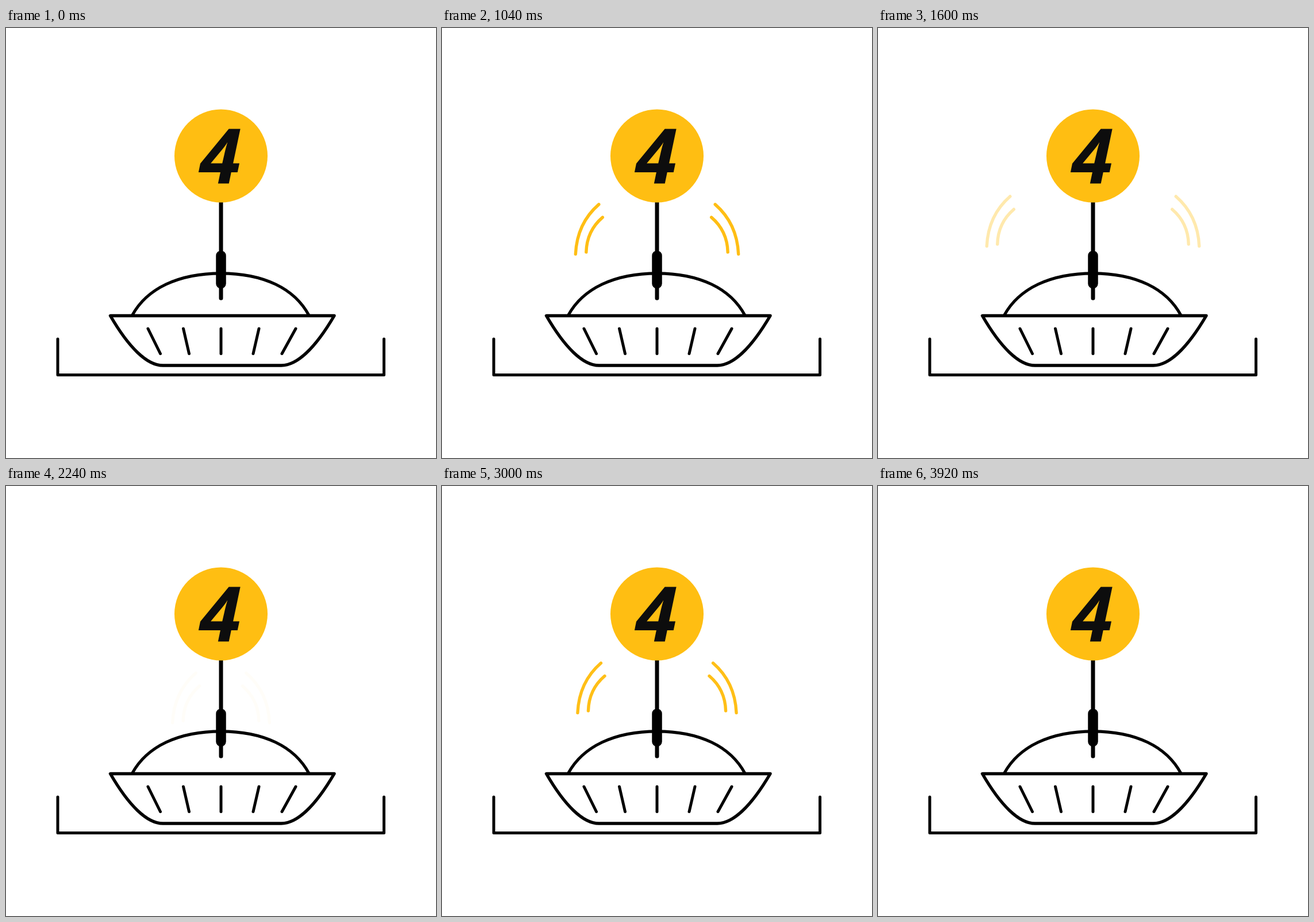
Animation of 748x748 px, one loop 4000 ms. Source, as an HTML page with a canvas:

```html
<!DOCTYPE html>
<html lang="en">
<head>
<meta charset="utf-8">
<title>Table marker</title>
<style>
  html, body { margin: 0; width: 100%; height: 100%; overflow: hidden; background: #fff; }
  canvas { display: block; width: 748px; height: 748px; }
</style>
</head>
<body>
<canvas id="stage" width="748" height="748"></canvas>
<script>
const SIZE = 748, MID = 374, PERIOD = 2000, STEP = 40;
const YELLOW = '#ffbe12', BLACK = '#000', INK = '#0d0d0d';
const FONT = '"Open Sans", "Noto Sans", sans-serif';
const ctx = document.getElementById('stage').getContext('2d');

const clamp = v => Math.min(1, Math.max(0, v));
const ease = v => (1 - Math.cos(Math.PI * clamp(v))) / 2;
const ramp = (t, from, to) => ease((t - from) / (to - from));

function stroke(d, width, color = BLACK) {
  ctx.lineWidth = width;
  ctx.strokeStyle = color;
  ctx.stroke(new Path2D(d));
}

function drawDish() {
  stroke('M90 541V603.5H657.5V541', 5);
  stroke('M219.5 500C245 453 300 426.8 374 426.8S502 453 527 500', 5.2);
  stroke('M181.5 500.5H571C539 555 507 587 479 587H273C245 587 213 555 181.5 500.5Z', 5.4);
  stroke('M247 523L268.5 566.5M308.5 523L318.5 566.5M374 523V566.5' +
         'M440 523L430 566.5M504 523L480 566.5', 5);
}

function drawMarker() {
  stroke('M374 290V470', 7);
  stroke('M374 396V444.5', 17.5);
  ctx.fillStyle = YELLOW;
  ctx.beginPath();
  ctx.arc(MID, 222.5, 81, 0, Math.PI * 2);
  ctx.fill();
  drawDigit('4');
}

// Digit sized to 95px tall and centred on its ink.
function drawDigit(text) {
  const setFont = px => { ctx.font = `italic 700 ${px}px ${FONT}`; };
  setFont(100);
  setFont(100 * 95 / ctx.measureText(text).actualBoundingBoxAscent);
  const box = ctx.measureText(text);
  const shift = (box.actualBoundingBoxRight - box.actualBoundingBoxLeft) / 2;
  ctx.fillStyle = INK;
  ctx.fillText(text, 371.5 - shift, 271);
}

function drawWaves(t) {
  const alpha = ramp(t, 140, 1090) * (1 - ramp(t, 1000, 2000));
  if (t < 200 || t >= 1920) return;
  const move = ease(t / PERIOD);
  ctx.globalAlpha = alpha;
  for (const side of [1, -1]) {
    ctx.save();
    ctx.translate(MID, 0);
    ctx.scale(side, 1);
    ctx.translate(33.2 - 115.5 * move - MID, 10.7 - 37.3 * move);
    stroke('M301 316Q263 349 260.5 402.5M307.5 338.5Q280 362 279 399', 5.4, YELLOW);
    ctx.restore();
  }
  ctx.globalAlpha = 1;
}

function draw(now) {
  const t = Math.floor((now % PERIOD) / STEP) * STEP;
  ctx.fillStyle = '#fff';
  ctx.fillRect(0, 0, SIZE, SIZE);
  ctx.lineCap = ctx.lineJoin = 'round';
  drawDish();
  drawMarker();
  drawWaves(t);
}

const start = performance.now();
function loop() {
  draw(performance.now() - start);
  requestAnimationFrame(loop);
}
loop();
</script>
</body>
</html>
```
